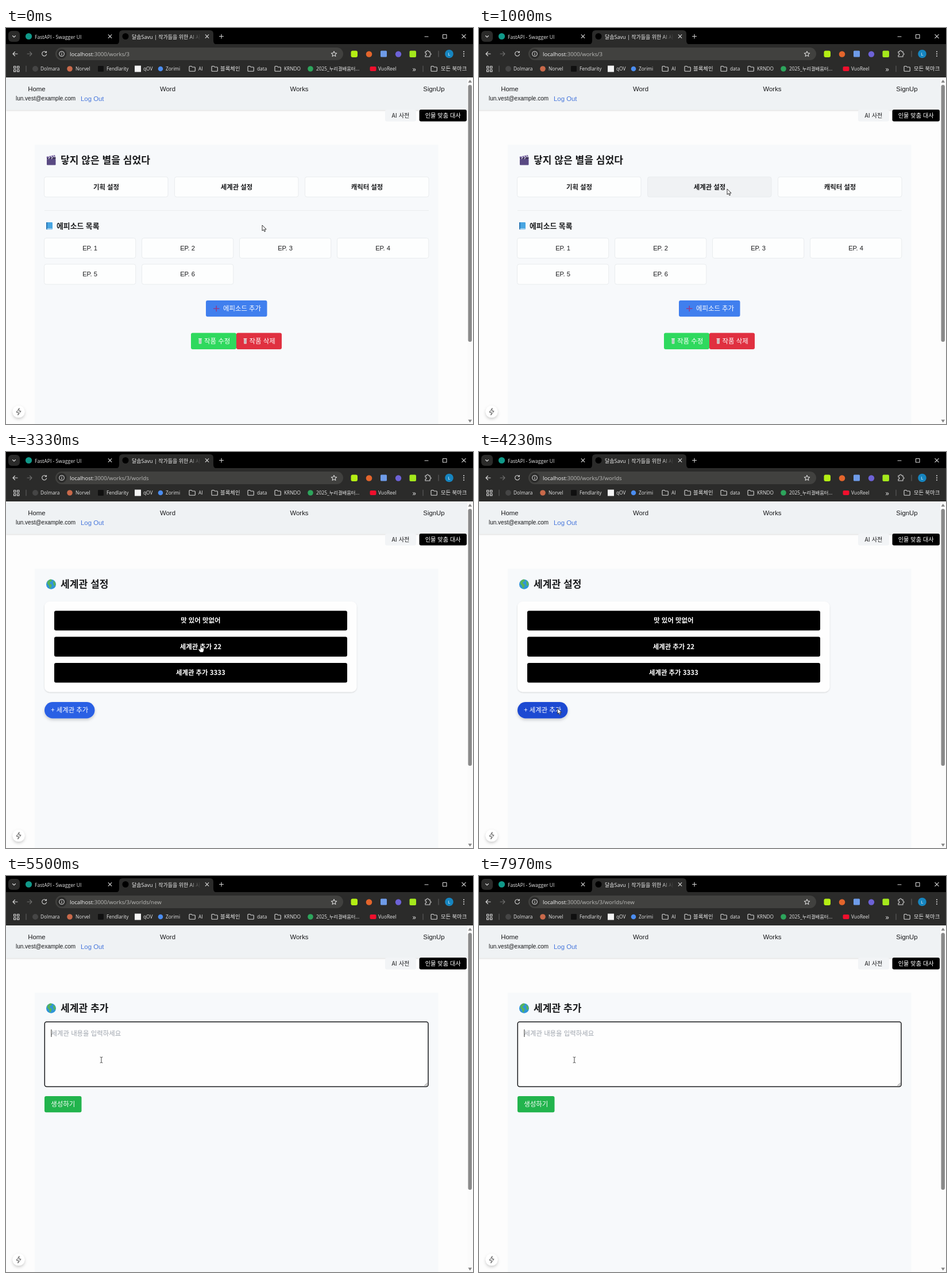
These frames come from a looping animation (813 by 689 pixels, 8 s). An HTML page:

```html
<!DOCTYPE html>
<html lang="ko">
<head>
<meta charset="utf-8">
<style>
  html, body { margin: 0; width: 100%; height: 100%; overflow: hidden; background: #fdfdfd; }
  svg { display: block; width: 100%; height: 100%; }
  .ui { font-family: "Open Sans", "Noto Sans CJK KR", "Noto Sans CJK", sans-serif; }
  .page { font-family: "Liberation Sans", "Noto Sans CJK KR", "Noto Sans CJK", sans-serif; }
  .ko { font-family: "Noto Sans CJK KR", "Noto Sans CJK", sans-serif; }
  .line { fill: none; stroke: #d8d8d8; stroke-width: 1.1; stroke-linecap: round; stroke-linejoin: round; }
  text { white-space: pre; }
</style>
</head>
<body>
<svg id="stage" viewBox="0 0 813 689"></svg>
<script>
const LOOP = 8000, WORLDS_AT = 1430, FORM_AT = 5090, FOCUS_AT = 5400, BLINK = 530;
const INK = '#18191b', LIGHT = '#e6e6e6';

// y is the visual middle of the line
const text = (x, y, str, size, fill = INK, extra = '') =>
  `<text x="${x}" y="${y + size * 0.36}" font-size="${size}" fill="${fill}" ${extra}>${str}</text>`;
const mid = (x, y, str, size, fill, extra = '') => text(x, y, str, size, fill, 'text-anchor="middle" ' + extra);
const rect = (x, y, w, h, r, fill, extra = '') =>
  `<rect x="${x}" y="${y}" width="${w}" height="${h}" rx="${r}" fill="${fill}" ${extra}/>`;
const dot = (x, y, r, fill, extra = '') => `<circle cx="${x}" cy="${y}" r="${r}" fill="${fill}" ${extra}/>`;
const line = (d, extra = '') => `<path class="line" d="${d}" ${extra}/>`;
const group = (body, attrs) => `<g ${attrs}>${body}</g>`;
const bold = 'class="ko" font-weight="700"', ko = 'class="ko"', medium = 'class="ko" font-weight="500"';

const cross = (x, y, r = 2.8) => line(`M${x - r} ${y - r}l${2 * r} ${2 * r}m0 ${-2 * r}l${-2 * r} ${2 * r}`);
const folder = x => line(`M${x - 5} 67.5q0-1 1-1h3l1.3 1.5h4q1 0 1 1v5.2q0 1-1 1h-8.3q-1 0-1-1z`);

function tabStrip() {
  return rect(0, 0, 813, 30, 0, '#000') + rect(4, 5, 20, 19, 6, '#2b2b2a') + line('M11.5 13.5l2.5 2.5l2.5-2.5') +
    dot(39.5, 14.5, 5.6, '#109989') + text(50, 15.5, 'FastAPI - Swagger UI', 8.6, LIGHT) + cross(181, 14.5) +
    '<path d="M190 29q7 0 7-7v-12q0-6 6-6h152q6 0 6 6v12q0 7 7 7z" fill="#2b2b2a"/>' +
    dot(208, 14.5, 5.5, '#000') +
    group(text(219, 15.5, '달솜Savu | 작가들을 위한 AI 사전', 9, 'url(#fade)'), 'clip-path="url(#tabClip)"') +
    cross(350, 14.5) + line('M371.5 14.5h7m-3.5-3.5v7') +
    line('M729 15h6') + line('M760.5 11.5h6.5v6.5h-6.5z') + cross(797, 14.5, 3.2);
}

function toolbar() {
  return rect(0, 28, 813, 58, 0, '#2b2b2a') +
    line('M20 45h-8m3.5-3.5l-3.5 3.5l3.5 3.5') + line('M37 45h8m-3.5-3.5l3.5 3.5l-3.5 3.5', 'stroke-opacity=".4"') +
    line('M70 42.5a4 4 0 1 0 .6 3.2m-.2-5.2v2.3h-2.3') +
    rect(86, 34, 501, 22, 11, '#41413f') + dot(97, 45, 8.5, '#2b2b2a') +
    `<circle class="line" cx="97" cy="45" r="4.3"/>` + line('M97 44.6v2.5m0-4.3v.1') +
    `<text x="111" y="48.5" font-size="9.6" fill="#f2f2f2">localhost<tspan fill="#bcbcba">:3000<tspan id="path"></tspan></tspan></text>` +
    line('M571 40.5l1.4 3l3.3.4l-2.5 2.2l.7 3.2l-2.9-1.7l-2.9 1.7l.7-3.2l-2.5-2.2l3.3-.4z') +
    rect(600.5, 39.5, 11.5, 11.5, 3, '#b4ee14') + dot(632, 45.5, 5.3, '#e3652c') + rect(652, 39.5, 11, 11, 1.5, '#6e9be8') +
    dot(683, 45.5, 5.2, '#6d62d6') + rect(702.5, 39.5, 11.5, 11.5, 2, '#a4e81c') +
    line('M730 41h2.3q0-2 1.6-2t1.6 2h2.5v2.8q2 0 2 1.6t-2 1.6v3h-8v-2.8q2 0 2-1.7t-2-1.7z') +
    line('M753 40v10', 'stroke-opacity=".3"') + dot(771.5, 45, 7.3, '#1685c0') + mid(771.5, 45, 'L', 7.5, '#fff') +
    [41.3, 45, 48.7].map(y => dot(797, y, 1, LIGHT)).join('') + bookmarks();
}

function bookmarks() {
  const y = 71, label = (x, str, size = 8.3) => text(x, y, str, size, LIGHT);
  const apps = [13.5, 19.5].map(x => [66.5, 72.5].map(v => line(`M${x} ${v}h3.4v3.4h-3.4z`)).join('')).join('');
  const marks = dot(51, y, 5, '#454545') + dot(111, y, 4.8, '#c9694a') + rect(160, 66, 10, 10, 1, '#101010') +
    rect(224, 65.5, 11, 11, 0, '#f4f4f4') + dot(269, y, 4.3, '#4b8df0') + dot(530, y, 4.8, '#2da55c') + rect(633.5, 67, 11, 8, 2, '#f00f2d');
  const names = [[60, 'Dolmara'], [121, 'Norvel'], [175, 'Fendlarity'], [239, 'qOV'], [278, 'Zorimi'], [335, 'AI'],
    [373, '블록체인', 9.4], [437, 'data'], [484, 'KRNDO'], [540, '2025_누리결배움터...', 8.3], [648, 'VuoReel'],
    [707.5, '»', 13], [757, '모든 북마크', 9.3]];
  return apps + marks + names.map(n => label(...n)).join('') + [324, 363, 426, 473, 745].map(folder).join('') +
    line('M35 66v10M726 66v10', 'stroke-opacity=".3"');
}

function frame() {
  const nav = [[53.5, 'Home'], [281.5, 'Word'], [510.5, 'Works'], [745, 'SignUp']];
  return rect(0, 86, 813, 603, 0, '#fdfdfd') + rect(0, 86, 803, 56.5, 0, '#eff2f4', 'filter="url(#soft)"') +
    nav.map(([x, s]) => mid(x, 105.5, s, 11.4)).join('') +
    text(17, 122.5, 'lun.vest@example.com', 10) + text(130, 122.5, 'Log Out', 11.4, '#4777dc') +
    rect(660, 142, 54, 20.5, 3, '#f2f4f6') + mid(687, 152, 'AI 사전', 10.2, INK, ko) +
    rect(719.5, 142, 82.5, 20.5, 3, '#000') + mid(760.7, 152, '인물 맞춤 대사', 10.2, '#fff', medium) +
    rect(50, 203, 702.5, 486, 0, '#f7f9fb') +
    rect(803, 86, 10, 603, 0, '#fbfbfb') + rect(804.5, 99, 6.5, 447, 3.2, '#8a8a8a') +
    '<path d="M804.5 95l3.3-5l3.3 5zM804.5 681.500l3.300 5l3.300-5z" fill="#858585"/>' +
    dot(22, 667.5, 10.5, '#fff', 'filter="url(#lift)"') +
    '<path d="M23 661.500l-5 7h3.500l-.7 5l5.200-7h-3.600z" fill="none" stroke="#555" stroke-width="1" stroke-linejoin="round"/>';
}

const heading = str => text(95, 230, str, 17.1, INK, bold);
const globe = dot(78.5, 230.2, 8.5, '#2f95d8') +
  '<path d="M72 226q3-5 7-4.500l1 3l-4 2l1 3l3 2l-2 5l-2 1l-1-5l-3-3zM82 224l3 2l1.500 4l-2 4l-2-4z" fill="#58b45a"/>';
const box = (x, y, w, id = '') => rect(x, y, w, 35, 3.5, '#fdfefe', `stroke="#e7eaec" stroke-width=".9" ${id}`);

function workPage() {
  const clapper = rect(71, 228, 15.5, 10.5, 1.2, '#594a83') + rect(71, 224.500, 15.5, 3.5, .5, '#42375e') +
    '<path d="M70.500 224l14.500-3l.7 2.500l-14.500 3z" fill="#6d5a99"/><path d="M74 223.300l2 2.200m2-3l2 2.200m2-3l2 2.200M74 228l2-3m3 3l2-3" stroke="#ddd8ea" stroke-width="1.300"/>';
  const book = rect(70, 338, 11, 12.5, 1.2, '#48a5e2') + rect(70, 338, 2, 12.5, .8, '#2776b5') + rect(71.500, 348.800, 9, 1, 0, '#d6e9f5');
  const bin = x => rect(x - 2.4, 541.5, 4.8, 8, .8, '#e3e7e9', 'fill-opacity=".85"') + rect(x - 3, 540, 6, 1.3, .4, '#f2f2f2') +
    `<path d="M${x - .9} 543v5m1.800-5v5" stroke="#8f9a98" stroke-width=".6"/>`;
  const settings = ['기획 설정', '세계관 설정', '캐릭터 설정'].map((s, i) => {
    const x = 66.5 + i * 227;
    return box(x, 259, 215.5, i === 1 ? 'id="worldBox"' : '') + mid(x + 108, 276.5, s, 11.4, INK, bold);
  }).join('');
  const episodes = [...Array(6).keys()].map(i => {
    const x = 66.5 + i % 4 * 170, y = 365.5 + (i > 3) * 45.5;
    return box(x, y, 159.3) + mid(x + 79.6, y + 17.3, `EP. ${i + 1}`, 11.2);
  }).join('');
  return clapper + heading('닿지 않은 별을 심었다') + settings + rect(67, 317, 669, .9, 0, '#e9ecee') +
    book + text(88, 344, '에피소드 목록', 12.85, INK, bold) + episodes +
    rect(348, 474, 106.5, 28.3, 3, '#407fee') + '<path d="M361 488.300h10.500m-5.250-5v10" stroke="#8e3c8d" stroke-width="1.600"/>' +
    text(378, 488, '에피소드 추가', 11.4, '#fff', medium) +
    rect(322, 530.5, 79, 28.5, 3, '#2fd95e') + rect(401, 530.5, 79, 28.5, 3, '#e03040') +
    bin(338) + text(345, 545, '작품 수정', 11.4, '#fff', medium) + bin(416.5) + text(423.5, 545, '작품 삭제', 11.4, '#fff', medium);
}

function worldsPage() {
  const rows = ['맛 있어 맛없어', '세계관 추가 22', '세계관 추가 3333'].map((s, i) =>
    rect(84, 276.3 + i * 45.3, 510, 34.3, 3, '#000') + mid(338.8, 293.2 + i * 45.3, s, 11.4, '#fff', bold)).join('');
  return globe + heading('세계관 설정') + rect(67, 260, 543.5, 157.5, 9, '#fefefe', 'filter="url(#soft)"') + rows +
    rect(67, 435, 87.5, 28.5, 14.2, '#2b60e4', 'id="addBox" filter="url(#lift)"') + mid(110.8, 449, '+ 세계관 추가', 11.4, '#fff', medium);
}

function formPage() {
  return globe + heading('세계관 추가') + rect(67.3, 253.8, 667.7, 112.7, 3.5, '#fefefe', 'id="area"') +
    '<path d="M728.500 365l5-5m-2.500 5l2.500-2.500" stroke="#666" stroke-width=".9"/>' +
    text(78.5, 273.5, '세계관 내용을 입력하세요', 11.4, '#9ea4ad', ko) + rect(78.5, 267, .9, 13, 0, '#111', 'id="caret"') +
    rect(67, 383, 64.5, 28.3, 3, '#22b44d') + mid(99.2, 397, '생성하기', 11.4, '#fff', medium);
}

const pointers = {
  arrow: '<path d="M0 0v9.800l2.300-2l1.600 3.500l1.700-.7l-1.600-3.400h3.100z" fill="#fff" stroke="#222" stroke-width=".9"/>',
  hand: '<path d="M-1 1q0-1.300 1.100-1.300t1.100 1.300v3.600l3.200.8q1.300.4 1.200 1.800l-.6 3.300q-.3 2-2 2h-2.800q-1.200 0-2-1.200l-2.200-3.300q-.4-1 .5-1.400t2.500 1.300z" fill="#fff" stroke="#222" stroke-width=".9"/>',
  beam: '<path d="M-2.300-5q2.300 0 2.300 1q0-1 2.300-1M0-4v8M-2.300 5q2.300 0 2.300-1q0 1 2.300 1" fill="none" stroke="#333" stroke-width=".9"/>'
};

const stage = document.getElementById('stage');
stage.innerHTML = `<defs>
  <linearGradient id="fade" gradientUnits="userSpaceOnUse" x1="318" x2="339" y1="0" y2="0">
    <stop stop-color="#eee"/><stop offset="1" stop-color="#eee" stop-opacity="0"/></linearGradient>
  <clipPath id="tabClip"><rect x="217" y="4" width="122" height="24"/></clipPath>
  <filter id="soft" x="-5%" y="-10%" width="110%" height="125%"><feDropShadow dx="0" dy="1" stdDeviation="1.200" flood-opacity=".17"/></filter>
  <filter id="lift" x="-30%" y="-30%" width="160%" height="190%"><feDropShadow dx="0" dy="2.500" stdDeviation="2.500" flood-opacity=".2"/></filter>
</defs>` +
  group(frame() + group(workPage(), 'id="work"') + group(worldsPage(), 'id="worlds"') + group(formPage(), 'id="form"'), 'class="page"') +
  group(tabStrip() + toolbar(), 'class="ui"') +
  group(Object.entries(pointers).map(([k, v]) => group(v, `id="${k}"`)).join(''), 'id="pointer"');

const el = id => document.getElementById(id);
const show = (id, on) => el(id).setAttribute('display', on ? 'inline' : 'none');

// time, x, y
const moves = [[0, 446, 343], [300, 446, 343], [950, 432, 280], [1440, 432, 280], [1900, 344, 301], [2250, 344, 301],
  [2850, 339, 336], [3400, 339, 336], [3870, 140, 442], [4600, 133, 450], [5110, 133, 450], [5390, 166, 320], [LOOP, 166, 320]];

function pointerAt(t) {
  const i = moves.findIndex(m => m[0] > t), [t0, x0, y0] = moves[i - 1], [t1, x1, y1] = moves[i];
  const u = (t - t0) / (t1 - t0), e = u * u * (3 - 2 * u);
  return [x0 + (x1 - x0) * e, y0 + (y1 - y0) * e];
}

function draw(t) {
  const page = t < WORLDS_AT ? 'work' : t < FORM_AT ? 'worlds' : 'form';
  const [x, y] = pointerAt(t), focused = t >= FOCUS_AT;
  const inside = (l, top, w, h) => x >= l && x <= l + w && y >= top && y <= top + h;
  const onRow = [276.3, 321.6, 366.9].some(top => inside(84, top, 510, 34.3));
  const kind = page === 'worlds' && onRow ? 'hand' : page === 'form' && inside(67, 254, 668, 113) ? 'beam' : 'arrow';

  for (const id of ['work', 'worlds', 'form']) show(id, id === page);
  for (const id in pointers) show(id, id === kind);
  el('pointer').setAttribute('transform', `translate(${x} ${y})`);
  el('path').textContent = '/works/3' + { work: '', worlds: '/worlds', form: '/worlds/new' }[page];
  el('worldBox').setAttribute('fill', inside(293.5, 259, 215.5, 35) ? '#f0f2f4' : '#fdfefe');
  el('addBox').setAttribute('fill', inside(67, 435, 87.5, 28.5) ? '#1e4ad2' : '#2b60e4');
  el('area').setAttribute('stroke', focused ? '#17181b' : '#d1d5db');
  el('area').setAttribute('stroke-width', focused ? 1.5 : 0.8);
  show('caret', focused && Math.floor((t - FOCUS_AT) / BLINK) % 2 === 0);
}

function tick() {
  draw(performance.now() % LOOP);
  requestAnimationFrame(tick);
}
tick();
</script>
</body>
</html>
```
